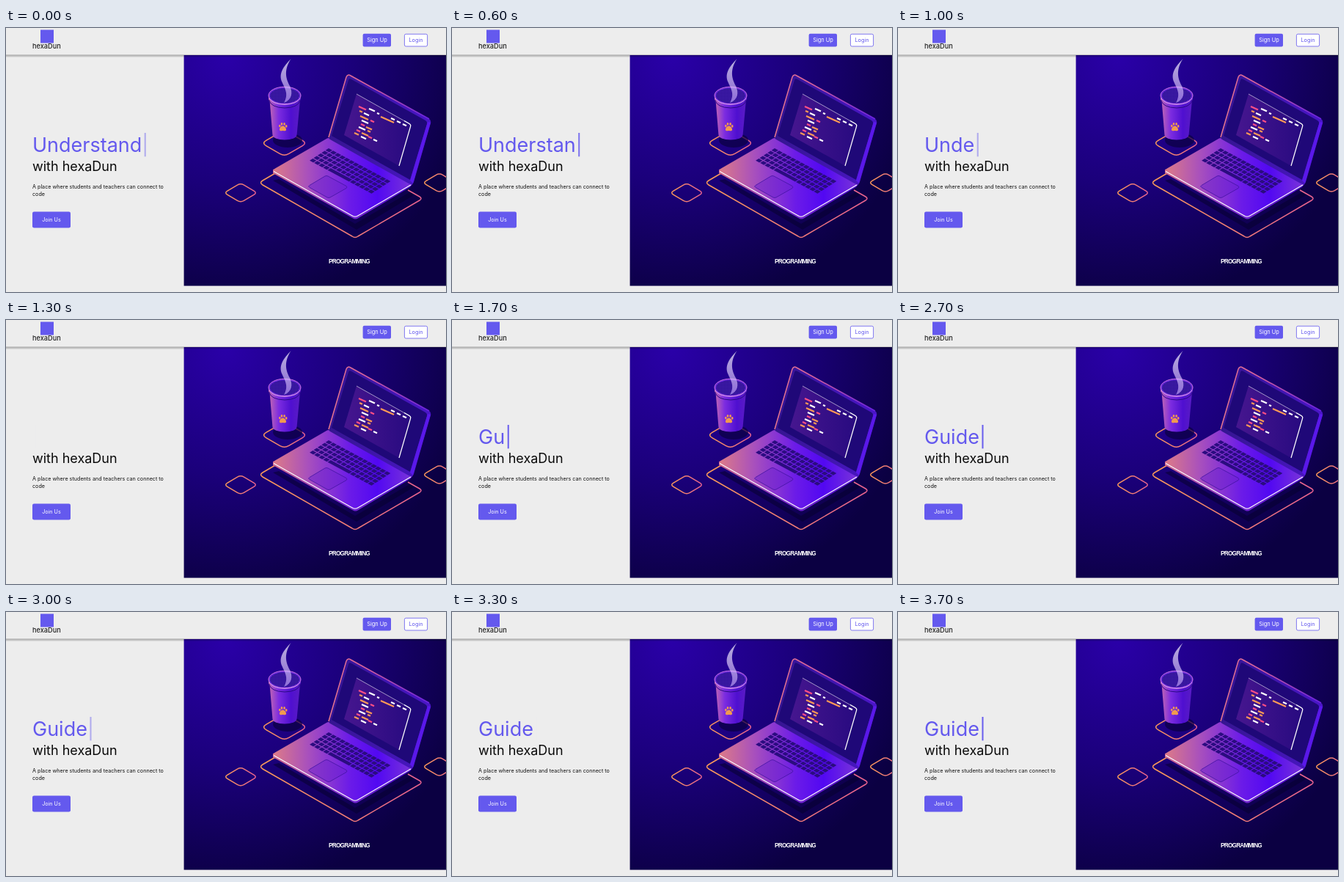
Recreate the animation shown at these times as an HTML page. Size 600 by 360 pixels, loop 3800 ms.

```html
<!DOCTYPE html>
<html lang="en">
<head>
<meta charset="utf-8">
<title>hexaDun</title>
<style>
  html, body { margin: 0; width: 100%; height: 100%; overflow: hidden; background: #ededed; }
  svg { display: block; width: 600px; height: 360px; font-family: Inter, sans-serif; }
  text { white-space: pre; }
  .small { font-size: 7.2px; fill: #111; }
  .line { fill: none; stroke: url(#glow); stroke-width: 1.5; stroke-linejoin: round; }
</style>
</head>
<body>
<svg viewBox="0 0 600 360">
  <defs>
    <radialGradient id="night" gradientUnits="userSpaceOnUse" cx="300" cy="40" r="340">
      <stop offset="0" stop-color="#2a00a8"/><stop offset=".5" stop-color="#1b007b"/><stop offset="1" stop-color="#0b0042"/>
    </radialGradient>
    <linearGradient id="glow"><stop stop-color="#fb9a58"/><stop offset="1" stop-color="#e8628f"/></linearGradient>
    <linearGradient id="rim"><stop stop-color="#e8788c"/><stop offset=".4" stop-color="#d8609c"/><stop offset="1" stop-color="#6a22e0"/></linearGradient>
    <linearGradient id="deck">
      <stop stop-color="#dc7a88"/><stop offset=".25" stop-color="#a850bd"/>
      <stop offset=".55" stop-color="#6b1be8"/><stop offset=".75" stop-color="#5208f2"/><stop offset="1" stop-color="#7a35d8"/>
    </linearGradient>
    <linearGradient id="side"><stop stop-color="#d0688c"/><stop offset=".5" stop-color="#7a2bd0"/><stop offset="1" stop-color="#4a0ad0"/></linearGradient>
    <linearGradient id="lid"><stop stop-color="#351590"/><stop offset="1" stop-color="#4a16c8"/></linearGradient>
    <linearGradient id="screen"><stop stop-color="#46168f"/><stop offset="1" stop-color="#280a80"/></linearGradient>
    <linearGradient id="cup">
      <stop stop-color="#c065b4"/><stop offset=".3" stop-color="#7c2ce0"/><stop offset=".7" stop-color="#4f0fd0"/><stop offset="1" stop-color="#5a1cc4"/>
    </linearGradient>
    <linearGradient id="steam" x2="0" y2="1"><stop stop-color="#fff" stop-opacity=".7"/><stop offset="1" stop-color="#c9a8ff" stop-opacity=".6"/></linearGradient>
    <linearGradient id="shade" x2="0" y2="1"><stop stop-opacity=".32"/><stop offset="1" stop-opacity="0"/></linearGradient>
    <pattern id="dots" width="2" height="2" patternUnits="userSpaceOnUse"><rect width="2" height="2" fill="#2c1092"/><rect width="1" height="1" fill="#5a2cc8"/></pattern>
  </defs>

  <rect width="600" height="360" fill="#ededed"/>
  <rect x="242.6" y="37" width="358" height="314.600" fill="url(#night)"/>
  <rect y="36.500" width="600" height="4" fill="url(#shade)"/>

  <!-- header -->
  <rect x="47" y="2.5" width="18" height="18" fill="#6459ee"/>
  <text x="36" y="28" font-size="9.2" font-weight="500" fill="#222">hexaDun</text>
  <rect x="486.600" y="7.800" width="38.400" height="17.700" rx="2" fill="#6459ee"/>
  <text x="506" y="19.3" font-size="7.4" fill="#fff" text-anchor="middle">Sign Up</text>
  <rect x="543.4" y="8.300" width="31.200" height="16.700" rx="2" fill="#fff" stroke="#6459ee" stroke-width=".8"/>
  <text x="559" y="19.3" font-size="7.3" fill="#6459ee" text-anchor="middle">Login</text>

  <!-- message -->
  <text x="36" y="169" font-size="27" fill="#6459ee"><tspan id="word"></tspan><tspan id="caret">|</tspan></text>
  <text x="36" y="195" font-size="18" fill="#0a0a0a">with hexaDun</text>
  <text x="36" y="218.8" class="small">A place where students and teachers can connect to</text>
  <text x="36" y="229" class="small">code</text>
  <rect x="36" y="250.5" width="52" height="22" rx="2.2" fill="#6459ee"/>
  <text x="62" y="264.2" font-size="7.2" fill="#fff" text-anchor="middle">Join Us</text>

  <!-- floor -->
  <path d="M372 206L476 267L552 223L556 228L478 275L364 208Z" fill="#07002e" opacity=".55"/>
  <g id="tiles" class="line"></g>
  <path class="line" d="M548 221L564 230Q568 232.500 564 235L480 284Q476 287 472 284L350 214Q345 211 350 208L374 194"/>

  <!-- cup -->
  <ellipse cx="384" cy="153" rx="20" ry="10" fill="#0b0040" opacity=".7"/>
  <path d="M359.500 98L363.500 146Q365 152 380 152.500Q395 152 396.500 146L401 98Z" fill="url(#cup)"/>
  <path d="M358 91V97Q360 108 380 108.500Q400 108 402 97V91Z" fill="url(#cup)"/>
  <path d="M358.500 98Q361 108.500 380 109Q399 108.500 401.500 98" fill="none" stroke="#2b0a86" stroke-width="1"/>
  <ellipse cx="380" cy="92" rx="22" ry="11.800" fill="#6a28dc" stroke="#c873dc" stroke-width="1"/>
  <ellipse cx="380" cy="92.200" rx="20" ry="10.200" fill="url(#dots)"/>
  <path d="M359 96Q364 104 380 104.500Q396 104 401 96" fill="none" stroke="#d9a5f2" stroke-width=".8"/>
  <path d="M388.500 42C379 52 371 62 376.500 74C380 82 386 90 379 102C390 98 391.500 88 387 79C381 68 379 57 388.500 42Z" fill="url(#steam)"/>
  <g fill="#f29a4e">
    <path d="M377.500 133.500C380 133.500 382.500 137 382 139C381 141.500 379 139.800 377.500 139.900C376 139.800 374 141.500 373 139C372.500 137 375 133.500 377.500 133.500Z"/>
    <ellipse cx="373.300" cy="133.600" rx="1.300" ry="1.800"/><ellipse cx="376" cy="130.800" rx="1.300" ry="1.900"/>
    <ellipse cx="379.600" cy="130.900" rx="1.300" ry="1.900"/><ellipse cx="382.200" cy="133.900" rx="1.300" ry="1.800"/>
  </g>

  <!-- laptop -->
  <path d="M364 193V198L474 260Q476 261 479 260L551 217L555 212L470 160Z" fill="url(#side)"/>
  <path d="M367 191.500L437 151Q440 149 444 151L553 211Q555 213 552 215L479 256Q476 258 473 256L367 196Q363 194 367 191.500Z" fill="url(#deck)"/>
  <path d="M365 195.500L473 256.500Q476 258 479 256.500L552 214" fill="none" stroke="#fff" stroke-width="1.1"/>
  <g id="keys" fill="#2b0c80"></g>
  <path d="M414 214.500L435 202Q437 201 439 202L464 215.500Q466 217 464 218.500L442 231Q440 232 438 231L414 217.500Q411 216 414 214.500Z" fill="#6f22d0" fill-opacity=".5" stroke="#4313a4" stroke-width=".8"/>
  <path d="M440 148L464 67Q466 62.500 470 65L577 124Q580 126 579 130L556 210Q554 215 549 212L442 152Q440 151 440 148Z" fill="url(#lid)"/>
  <path d="M444 147L467 71Q468 68 471 70L572 126Q575 128 574 131L551 207Z" fill="#1f0878"/>
  <path d="M575 128L579 129L555 212L551 208Z" fill="#5a18ea"/>
  <path d="M440 149L464 67Q466 62.500 470 65L577 124" fill="none" stroke="url(#rim)" stroke-width="1.500"/>
  <path d="M478 90L552 131.500L536 188L461 146Z" fill="url(#screen)"/>
  <path d="M478 90L550 130.500" fill="none" stroke="#fff" stroke-width=".7" opacity=".8"/>
  <path d="M543 126.500L550 130.500Q552.500 132 551.500 134.500L536 188" fill="none" stroke="#fff" stroke-width="1.200"/>
  <g id="code" stroke-width="2.200"></g>

  <text x="468" y="321.300" font-family="Liberation Sans, Arial, sans-serif" font-weight="700" font-size="8.200" letter-spacing="-.75" fill="#fff" text-anchor="middle">PROGRAMMING</text>
</svg>
<script>
const el = id => document.getElementById(id);

// Isometric tiles: centre and half sizes
const tile = (x, y, w, h) => {
  const a = w * .8, b = h * .8, c = w * .2, d = h * .2;
  return `<path d="M${x - a} ${y - d}L${x - c} ${y - b}Q${x} ${y - h} ${x + c} ${y - b}L${x + a} ${y - d}Q${x + w} ${y} ${x + a} ${y + d}L${x + c} ${y + b}Q${x} ${y + h} ${x - c} ${y + b}L${x - a} ${y + d}Q${x - w} ${y} ${x - a} ${y - d}Z"/>`;
};
el('tiles').innerHTML = tile(320, 224.8, 22.5, 13.3) + tile(379.5, 157, 31, 18) + tile(591, 211, 22.5, 13.3);

// Keyboard: columns run down-right, rows run down-left
const key = (c, r, span = 1) => {
  const at = (u, v) => `${440 + u * 6.1 - v * 5.4} ${164 + u * 3.25 + v * 3.5}`;
  const u = c + span - .18, v = r + .8;
  return `<path d="M${at(c, r)}L${at(u, r)}L${at(u, v)}L${at(c, v)}Z"/>`;
};
let keys = '';
for (let r = 0; r < 5; r++)
  for (let c = 0; c < 14; c++)
    if (r < 4 || c < 4 || c > 8) keys += key(c, r);
el('keys').innerHTML = keys + key(4, 4, 5);

// Code on the screen: x, y, width, colour
const pink = '#ff4f86', gold = '#ff9a55', white = '#fff';
const dashes = [
  [481, 107, 10, pink], [495, 110, 8, white], [506, 116, 3, white], [511, 121, 18, gold],
  [525, 123, 5, white], [533, 127, 5, white], [541, 131, 5, white],
  [482, 113, 4, gold], [488, 116, 7, white], [483, 120, 11, gold], [497, 126, 5, pink],
  [485, 126, 9, white], [484, 131, 5, pink], [491, 135, 8, gold],
  [481, 135, 9, white], [493, 140, 4, gold], [478, 139, 5, pink], [485, 143, 9, gold],
  [475, 143, 6, gold], [484, 148, 7, white], [494, 148, 5, pink], [501, 152, 5, white]
];
el('code').innerHTML = dashes.map(([x, y, w, c]) =>
  `<path d="M${x} ${y}l${w} ${w * .45}" stroke="${c}"/>`).join('');

// CSS "ease" curve
function ease(x) {
  let lo = 0, hi = 1, s;
  for (let i = 0; i < 20; i++) {
    s = (lo + hi) / 2;
    if (.75 * s * (1 - s) + s ** 3 < x) lo = s; else hi = s;
  }
  return .3 * s * (1 - s) ** 2 + 3 * s * s * (1 - s) + s ** 3;
}

const steps = (t, start, gap, max) => Math.max(0, Math.min(max, Math.floor((t - start) / gap) + 1));

function draw(now) {
  const t = Math.floor(now % 3800 / 100) * 100;
  const left = 10 - steps(t, 595, 75, 10);
  el('word').textContent = left ? 'Understand'.slice(0, left) : 'Guide'.slice(0, steps(t, 1420, 145, 5));
  const p = (t + 660) % 1000 / 500;
  el('caret').setAttribute('fill-opacity', p < 1 ? ease(p) : 1 - ease(p - 1));
}

let begin;
function tick(now) {
  begin ??= now;
  draw(now - begin);
  requestAnimationFrame(tick);
}
draw(0);
requestAnimationFrame(tick);
</script>
</body>
</html>
```
